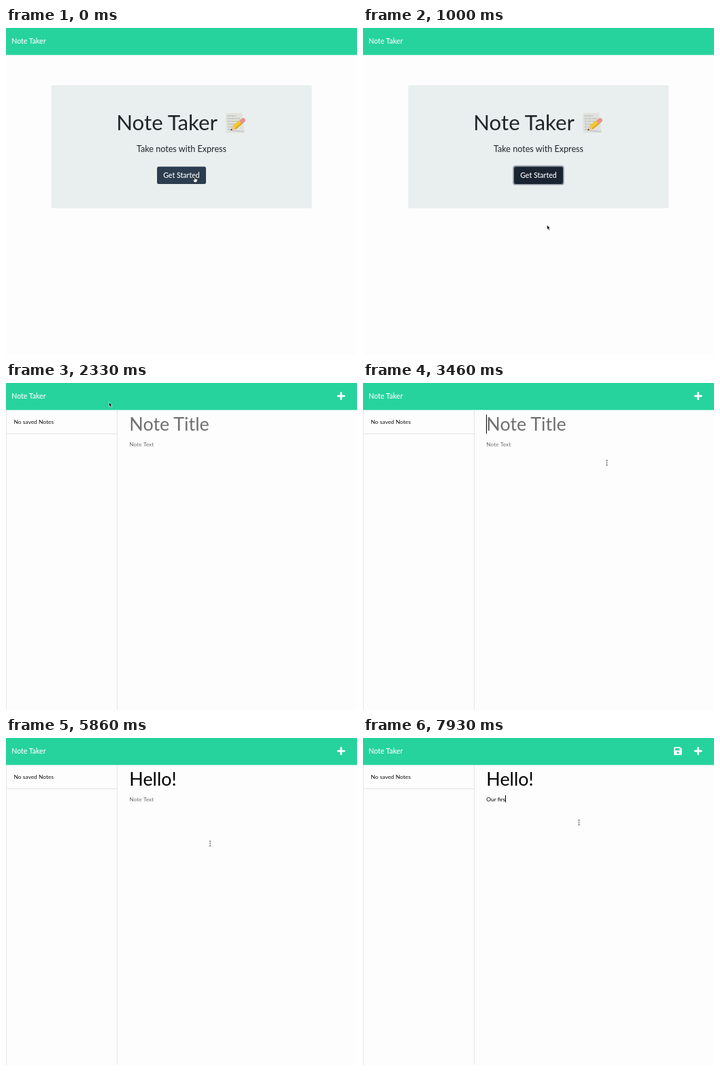
Recreate the animation shown at these times as an HTML page. Size 516 by 480 pixels, loop 8000 ms.

```html
<!DOCTYPE html>
<html lang="en">
<head>
<meta charset="utf-8">
<title>Note Taker</title>
<style>
  html, body { margin: 0; width: 100%; height: 100%; overflow: hidden; background: #fdfdfd; }
  svg { display: block; width: 516px; height: 480px; font-family: Lato, sans-serif; }
  text { white-space: pre; }
  .line { stroke: #e4e5e6; }
  .mid { text-anchor: middle; }
</style>
</head>
<body>
<svg viewBox="0 0 516 480">
  <rect width="516" height="480" fill="#fdfdfd"/>
  <rect width="516" height="39.6" fill="#26d39c"/>
  <text x="8.3" y="23.3" font-size="10.5" font-weight="500" fill="#fff">Note Taker</text>

  <g id="home">
    <rect x="66.5" y="84" width="383" height="180.5" rx="2" fill="#e9eeee"/>
    <text x="162.2" y="150.3" font-size="31.25" fill="#212529">Note Taker</text>
    <g id="memo">
      <path d="M323 125 L347 124.500 L350.500 154 L323.500 154Z" fill="#e1e2dd"/>
      <path d="M325.500 129H338M325.500 133H344M325.500 137H342M326 141H338M326 145H334M326 149H331"
            stroke="#a5a7a6" stroke-width="1.100" stroke-dasharray="3 .8 2 .7"/>
      <path d="M332 150.500L350 152" stroke="#c5c6c2" stroke-width="1.500"/>
      <path d="M330 150.500L333.500 143L338 148.500Z" fill="#e8c693"/>
      <path d="M330 150.500L331.200 147.800L332.900 149.800Z" fill="#333"/>
      <path d="M335.500 146L346 137.500" stroke="#f2c832" stroke-width="7"/>
      <path d="M337 148L347.500 139.500" stroke="#dba622" stroke-width="2"/>
      <path d="M345.500 138L347 136.800" stroke="#b9bcc0" stroke-width="7"/>
      <path d="M347 136.800L348.600 135.500" stroke="#e9938f" stroke-width="6.500" stroke-linecap="round"/>
    </g>
    <text class="mid" x="258" y="182.300" font-size="12.600" fill="#212529">Take notes with Express</text>
    <rect id="ring" x="221.200" y="202.700" width="73.600" height="27" rx="3" fill="none" stroke="#929ca6" stroke-width="1.800"/>
    <rect id="button" x="222" y="203.500" width="72" height="25.500" rx="2.500"/>
    <text class="mid" x="258" y="219.900" font-size="10.600" font-weight="500" fill="#fff">Get Started</text>
  </g>

  <g id="notes">
    <path class="line" d="M.5 40V480M163.500 40V480"/>
    <g id="list">
      <text x="11.400" y="60.300" font-size="8.450" fill="#111">No saved Notes</text>
      <path class="line" d="M0 74.500H163"/>
    </g>
    <path d="M492.700 14.500V23.700M488.100 19.100H497.300" stroke="#fff" stroke-width="2.800" stroke-linecap="round"/>
    <path id="save" fill="#fff" fill-rule="evenodd"
          d="M458.500 13.200H466L468.800 16V23.500Q468.800 25 467.300 25H458.500Q457 25 457 23.500V14.700Q457 13.200 458.500 13.200Z
             M458.800 15V18.200H465.500V15Z M461.200 21.700A1.700 1.700 0 1 0 464.600 21.700A1.700 1.700 0 1 0 461.200 21.700Z"/>
    <text id="title" x="181.300" y="70.300" font-size="26.900"></text>
    <text id="body" x="181.300" y="92.500" font-size="8.450"></text>
    <rect id="caret" width="1"/>
  </g>

  <g id="cursor">
    <path id="hand" d="M-1.300 -4.300Q-.5 -5 0 -4V-1.200L2.500 -.7Q3.500 -.4 3.300 1L2.500 4.300H-1.200L-3.200 1Q-3.200 0 -2.200 .3L-1.400 1Z"
          fill="#fff" stroke="#222" stroke-width=".8"/>
    <path id="arrow" d="M-1.500 -4V3L.1 1.600L1.200 4.200L2.400 3.600L1.300 1.200H3.300Z" fill="#111" stroke="#fff" stroke-width=".6"/>
    <g id="beam" fill="none" stroke="#6f6f6f">
      <path d="M-1.500 -3.600H1.500M-1.500 3.600H1.500M-1 0H1" stroke-width="1"/>
      <path d="M0 -4V4" stroke-width=".8" opacity=".65"/>
    </g>
  </g>
</svg>
<script>
const LOOP = 8000, BLINK = 535, BODY_FOCUS = 6000;
const el = id => document.getElementById(id);
const show = (id, on) => { el(id).style.display = on ? '' : 'none'; };
const between = (t, a, b) => t >= a && t < b;

const titleKeys = [4260, 4530, 4660, 4800, 5000, 5200];
const bodyKeys = [6730, 6930, 7060, 7200, 7330, 7460, 7530, 7930];

// Cursor stops: time, x, y
const path = [
  [0, 278, 222.5], [860, 278, 223.5], [1000, 272, 293], [1060, 271.5, 301.5],
  [1660, 271.5, 301.5], [1860, 266, 53], [2200, 266, 53], [2400, 110, 24],
  [2530, 27, 56], [2700, 60, 62], [3000, 354, 120], [3200, 358.5, 117],
  [5260, 358.5, 117], [5600, 342, 120], [5850, 300, 155], [6200, 317.5, 124], [LOOP, 317.5, 124]
];

function cursorAt(t) {
  const i = path.findIndex(p => p[0] > t);
  const [t0, x0, y0] = path[i - 1], [t1, x1, y1] = path[i];
  const u = (t - t0) / (t1 - t0), k = u * u * (3 - 2 * u);
  return [x0 + (x1 - x0) * k, y0 + (y1 - y0) * k];
}

function typeInto(id, text, keys, placeholder, t) {
  const count = keys.filter(k => k <= t).length;
  el(id).textContent = count ? text.slice(0, count) : placeholder;
  el(id).setAttribute('fill', count ? '#000' : '#707070');
  return count;
}

function drawCaret(t, id, count, keys, focusTime, y, height) {
  const since = t - (count ? keys[count - 1] : focusTime);
  show('caret', since >= 0 && Math.floor(since / BLINK) % 2 === 0);
  const width = count ? el(id).getComputedTextLength() : 0;
  const caret = el('caret');
  caret.setAttribute('x', 181 + Math.round(width));
  caret.setAttribute('y', y);
  caret.setAttribute('height', height);
}

function draw(t) {
  const home = t < 1060;
  show('home', home);
  show('notes', !home);

  const dark = Math.min(1, Math.max(0, (t - 40) / 150));
  const mix = (a, b) => Math.round(a + (b - a) * dark);
  el('button').setAttribute('fill', `rgb(${mix(45, 26)},${mix(61, 36)},${mix(80, 49)})`);
  show('ring', t >= 700);

  show('list', t >= 1130);
  show('save', t >= 6730);
  const titleCount = typeInto('title', 'Hello!', titleKeys, 'Note Title', t);
  const bodyCount = typeInto('body', 'Our firs', bodyKeys, 'Note Text', t);
  if (t < BODY_FOCUS) drawCaret(t, 'title', titleCount, titleKeys, 3460, 46.5, 28);
  else drawCaret(t, 'body', bodyCount, bodyKeys, BODY_FOCUS, 84, 10.5);

  const [x, y] = cursorAt(t);
  const arrow = between(t, 900, 1060) || (!home && (x < 163 || y < 40));
  el('cursor').setAttribute('transform', `translate(${x} ${y})`);
  show('cursor', !between(t, 5260, 5600));
  show('hand', t < 900);
  show('arrow', arrow);
  show('beam', !home && !arrow);
}

const start = performance.now();
function frame() {
  draw((performance.now() - start) % LOOP);
  requestAnimationFrame(frame);
}
frame();
</script>
</body>
</html>
```
